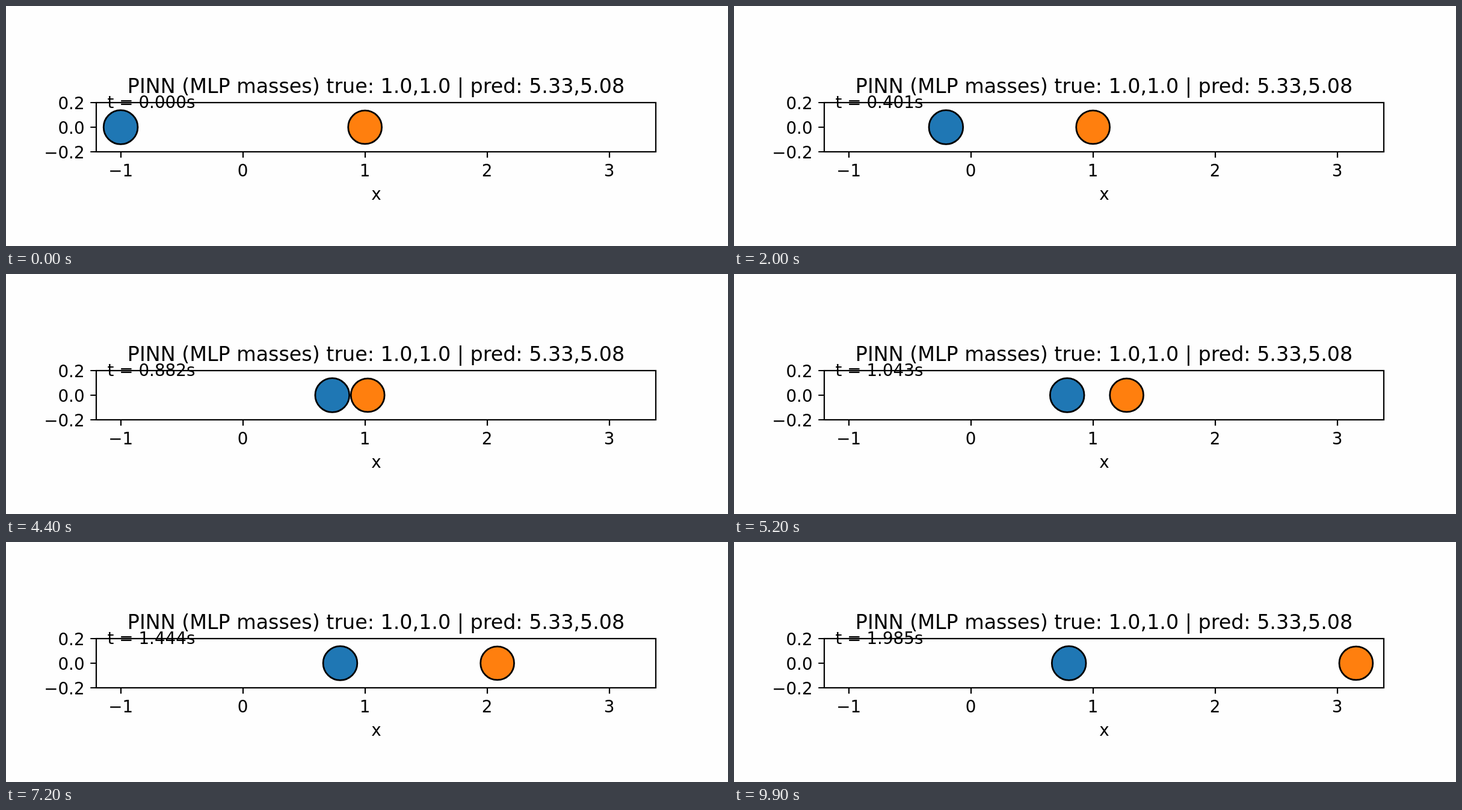
An HTML page that plays this animation: 1200x400 px, repeating every 10 s.

```html
<!DOCTYPE html>
<html lang="en">
<head>
<meta charset="utf-8">
<title>Two-body collision</title>
<style>
  html, body { margin: 0; width: 100%; height: 100%; overflow: hidden; background: #fefefe; }
  svg { display: block; width: 1200px; height: 400px; }
  text { font: 27.78px "DejaVu Sans", sans-serif; white-space: pre; }
  .mid { text-anchor: middle; }
  .end { text-anchor: end; }
  .title { font-size: 33.33px; }
  .line { fill: none; stroke: #000; stroke-width: 2.22; }
  .ball { stroke: #000; stroke-width: 2.78; }
</style>
</head>
<body>
<svg viewBox="0 0 1200 400">
  <circle id="blue" class="ball" cx="190.6" cy="202" r="28.37" fill="#1f77b4"/>
  <circle id="orange" class="ball" cx="596.6" cy="202" r="27.92" fill="#ff7f0e"/>
  <rect class="line" x="150" y="161" width="930" height="82"/>
  <path id="ticks" class="line"/>
  <g id="labels"></g>
  <text class="mid title" x="615" y="145">PINN (MLP masses) true: 1.0,1.0 | pred: 5.33,5.08</text>
  <text class="mid" x="615.5" y="323">x</text>
  <text id="clock" x="168.6" y="170">t = 0.000s</text>
</svg>
<script>
const $ = id => document.getElementById(id);
const STEP_MS = 100, STEPS = 100, DT = 8 / 399;

function addLabel(cls, x, y, str) {
  const el = document.createElementNS("http://www.w3.org/2000/svg", "text");
  el.setAttribute("class", cls);
  el.setAttribute("x", x);
  el.setAttribute("y", y);
  el.textContent = str;
  $("labels").append(el);
}

let ticks = "";
["−1", "0", "1", "2", "3"].forEach((str, i) => {
  const x = 190.6 + 203 * i;
  ticks += `M${Math.round(x)} 243v9.7`;
  addLabel("mid", x, 284, str);
});
["0.2", "0.0", "−0.2"].forEach((str, i) => {
  const y = 161 + 41 * i;
  ticks += `M150 ${y}h-9.7`;
  addLabel("end", 130.6, y + 10.5, str);
});
$("ticks").setAttribute("d", ticks);

// Smooth minimum / maximum round off the moment of impact.
const softMin = (a, b, k) => a - k * Math.log1p(Math.exp((a - b) / k));
const softMax = (a, b, k) => a + k * Math.log1p(Math.exp((b - a) / k));

function blueX(n) {
  const m = n - 61;
  const before = 190.6 + 8.06 * n + 0.0014 * n * n;
  const after = 554.6 + 0.085 * m - 0.0008 * m * m;
  return softMin(before, after, 11.4);
}

// Step and x of the orange ball once it has been hit.
const PATH = [[44, 585.3], [55, 677.6], [61, 728.4], [66, 768.6], [77, 856.6], [84, 914], [88, 946.8], [99, 1033.9]];

function orangeX(n) {
  let i = 1;
  while (i < PATH.length - 1 && n > PATH[i][0]) i++;
  const [n0, x0] = PATH[i - 1], [n1, x1] = PATH[i];
  return softMax(596.65, x0 + (x1 - x0) * (n - n0) / (n1 - n0), 13);
}

function draw(n) {
  $("blue").setAttribute("cx", blueX(n).toFixed(2));
  $("orange").setAttribute("cx", orangeX(n).toFixed(2));
  $("clock").textContent = `t = ${(n * DT).toFixed(3)}s`;
}

const start = performance.now();
function tick() {
  draw(Math.floor((performance.now() - start) / STEP_MS) % STEPS);
  requestAnimationFrame(tick);
}
tick();
</script>
</body>
</html>
```
